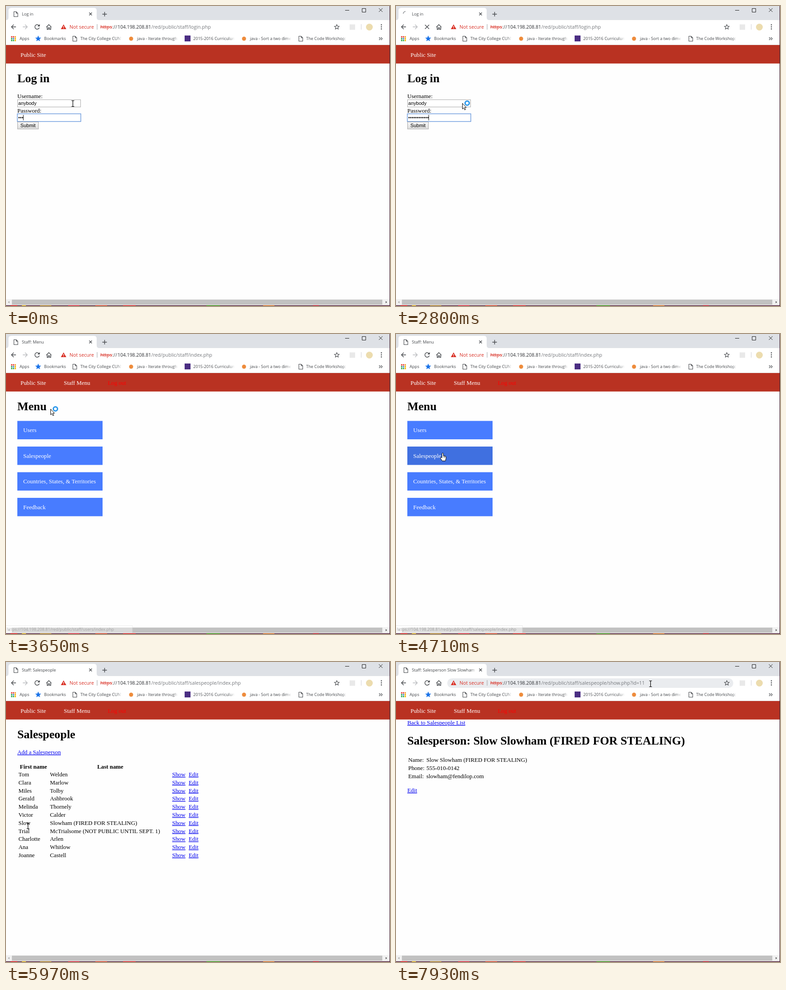
An HTML page for the animation above (8 s loop, 847 by 661 pixels).

```html
<!DOCTYPE html>
<html lang="en">
<head>
<meta charset="utf-8">
<title>Staff site walkthrough</title>
<style>
html, body { margin: 0; width: 100%; height: 100%; overflow: hidden; background: #fefefe; }
svg { display: block; }
text { white-space: pre; }
.page { font: 12.9px "Liberation Serif", serif; }
.head { font: bold 25.85px "Liberation Serif", serif; }
.bold { font-weight: bold; }
.mid { text-anchor: middle; }
.link { fill: #0000ee; text-decoration: underline; }
.form { font: 10.7px "Liberation Sans", sans-serif; }
.ui { font: 9.1px "Open Sans", sans-serif; fill: #45484c; }
.url { font: 10.7px "Open Sans", sans-serif; }
.host { font-size: 10.45px; }
.line { fill: none; stroke: #45484c; stroke-width: 1.4; }
.thin { fill: none; stroke: #222; stroke-width: 1; }
</style>
</head>
<body>
<svg id="stage" width="847" height="661" viewBox="0 0 847 661"></svg>
<script>
const LOOP = 8000;
const stage = document.getElementById('stage');

// Moments at which the screen is refreshed
const STEPS = [0, 280, 560, 1110, 1550, 1700, 2130,
  2410, 2530, 2680, 2800, 2950, 3080, 3210, 3340,
  3490, 3650, 3800, 3930, 4060, 4190, 4330, 4460,
  4580, 4710, 4860, 5000, 5140, 5280, 5420, 5560,
  5700, 5840, 5970, 6120, 6260, 6390, 6530, 6660,
  6780, 6920, 7060, 7210, 7330, 7480, 7630, 7780, 7930];
const KEYSTROKES = [280, 560, 1550, 1700, 2130, 2410, 2530, 2530, 2680];

// Pointer path: time, x, y
const PATH = [[0, 147.5, 215], [2680, 147.5, 215], [2800, 146, 214], [3340, 146, 214],
  [3490, 115, 178], [3650, 98, 165], [3800, 98, 153], [4060, 100, 200],
  [4330, 103, 256], [4580, 103, 262], [5280, 103, 263], [5560, 58, 330],
  [5840, 49, 355], [5970, 48.5, 361], [6120, 100, 371], [6390, 330, 363],
  [6660, 379, 354], [6780, 380, 352], [7210, 380, 352], [7330, 385, 335],
  [7630, 505, 110], [7780, 543, 39], [7930, 561.5, 48]];

// Status bubble: from, to, folder and file, opacity
const HINTS = [[3210, 3490, 'users/index.php', 1], [3490, 3800, 'users/index.php', .4],
  [4060, 4330, 'users/index.php', .5], [4460, 4860, 'salespeople/index.php', .5],
  [4860, 5280, 'salespeople/index.php', 1], [5280, 5420, 'salespeople/index.php', .4],
  [6780, 6920, 'salespeople/show.php...', .5], [6920, 7330, 'salespeople/show.php...', 1],
  [7330, 7480, 'salespeople/show.php...', .4]];

const LOADING = [[2800, 3080], [4860, 5280], [6920, 7060]];
const BUSY = [[2800, 4060], [4860, 5420], [6920, 7630]];

const PEOPLE = ['Tom Welden', 'Clara Marlow', 'Miles Tolby', 'Gerald Ashbrook',
  'Melinda Thornely', 'Victor Calder', 'Slow Slowham (FIRED FOR STEALING)',
  'Trial McTrialsome (NOT PUBLIC UNTIL SEPT. 1)', 'Charlotte Arlen', 'Ana Whitlow', 'Joanne Castell'];
const MENU = ['Users', 'Salespeople', 'Countries, States, &amp; Territories', 'Feedback'];

const within = (t, ranges) => ranges.some(([a, b]) => t >= a && t < b);
const text = (x, y, s, cls = 'page', fill) =>
  `<text x="${x}" y="${y}" class="${cls}"${fill ? ` style="fill:${fill}"` : ''}>${s}</text>`;
const rect = (x, y, w, h, fill, extra = '') =>
  `<rect x="${x}" y="${y}" width="${w}" height="${h}" fill="${fill}" ${extra}/>`;
const dot = (x, y, r, fill) => `<circle cx="${x}" cy="${y}" r="${r}" fill="${fill}"/>`;
const path = (d, cls = 'line', extra = '') => `<path d="${d}" class="${cls}" ${extra}/>`;
const shape = (d, fill, extra = '') => `<path d="${d}" fill="${fill}" ${extra}/>`;
const cross = (x, y, r, cls) => path(`M${x - r} ${y - r}l${2 * r} ${2 * r}m0 ${-2 * r}l${-2 * r} ${2 * r}`, cls);
const star = (x, y, r, fill, stroke) => {
  const points = Array.from({ length: 10 }, (_, i) => {
    const a = i * Math.PI / 5, d = i % 2 ? r * .45 : r;
    return `${x + d * Math.sin(a)},${y - d * Math.cos(a)}`;
  });
  return `<polygon points="${points.join(' ')}" fill="${fill}" stroke="${stroke}" stroke-width="1.1"/>`;
};
const doc = (x, y) => path(`M${x} ${y}h5l3.5 3.5v7.5h-8.5zM${x + 5} ${y}v3.5h3.5`, 'line', 'style="stroke-width:1.1"');
// Fades a label to white over the last 12 px and hides the rest
const fadeOut = (end, y, hidden) => rect(end - 12, y, 12.2, 14, 'url(#fade)') + rect(end, y, hidden, 14, '#fff');

const DEFS = `<defs>
  <linearGradient id="fade"><stop stop-color="#fff" stop-opacity="0"/><stop offset="1" stop-color="#fff"/></linearGradient>
  <linearGradient id="button" x2="0" y2="1"><stop stop-color="#f8f8f8"/><stop offset="1" stop-color="#dcdcdc"/></linearGradient>
</defs>`;

function pointerAt(t) {
  const i = PATH.findLastIndex(p => p[0] <= t), a = PATH[i], b = PATH[i + 1] || a;
  const k = b === a ? 0 : (t - a[0]) / (b[0] - a[0]);
  return [a[1] + (b[1] - a[1]) * k, a[2] + (b[2] - a[2]) * k];
}

function tabStrip(title, loading, t) {
  const icon = loading
    ? path('M16 17a5 5 0 0 1 5-5', 'line', `style="stroke:#8a8d91" transform="rotate(${(t - 2800) * .7} 21 17)"`)
    : doc(17.5, 12.5);
  return rect(0, 0, 847, 31, '#dee1e6')
    + shape('M0 31Q5.5 31 5.5 25V10Q5.5 4 12 4H194Q200 4 200 10V25Q200 31 206 31Z', '#fff')
    + icon + text(35, 21, title, 'ui') + fadeOut(177, 10, 20)
    + cross(186.5, 17.5, 3, 'line') + path('M212.5 18h10m-5-5v10')
    + path('M748 9.5h9M785.5 5.5h8v8h-8z', 'thin') + cross(826.5, 9, 4, 'thin');
}

function toolbar(file, loading, t) {
  let s = rect(0, 31, 847, 55, '#fff');
  if (t >= 7780) s += rect(113, 36, 631, 21, '#eaecef', 'rx="10.5"');
  else if (t >= 7060) s += shape('M551 36H123.5a10.5 10.5 0 0 0 0 21H551z', '#f1f3f4');
  s += path('M22 46H12m5-5l-5 5l5 5')
    + path('M37 46h10m-5-5l5 5l-5 5', 'line', 'style="stroke:#b9bbbe"')
    + (loading ? cross(68.5, 46, 4.5, 'line')
      : path('M73 43.5a5 5 0 1 0 .5 4') + shape('M74.5 40v5h-5z', '#45484c'))
    + path('M89 46.5l5.5-5.5l5.5 5.5M90.8 45.5v6h2.7v-3.5h2.5v3.5h2.7v-6')
    + shape('M127 40.5l6 10.5h-12z', '#d93025') + rect(126.4, 44, 1.3, 3.5, '#fff') + rect(126.4, 48.5, 1.3, 1.3, '#fff')
    + text(140, 50, 'Not secure', 'url', '#d93025') + rect(200.5, 40, 1, 12, '#9da0a4')
    + text(208, 50, 'https', 'url', '#d93025') + rect(208, 46, 26, 1, '#d93025')
    + text(234.5, 50, '://', 'url', '#45484c') + text(246, 50, '104.198.208.81', 'url host', '#303236')
    + text(320.5, 50, '/red/public/staff/' + file, 'url', '#75787c')
    + star(729.7, 46.5, 5.5, 'none', '#45484c')
    + rect(758, 40.5, 12, 12, '#e9e9e9') + rect(783, 40, 1, 12, '#d0d2d5') + dot(801.5, 46.5, 7.5, '#ecdcae');
  for (const y of [41.5, 46, 50.5]) s += dot(828, y, 1.3, '#45484c');
  return s;
}

function bookmarks() {
  const colors = ['#e8453c', '#e8453c', '#f4a22c', '#35a853', '#4285f4', '#f4b400', '#35a853', '#35a853', '#f4b400'];
  const orange = x => dot(x, 72, 4.5, '#ee8c3c');
  let s = colors.map((c, i) => rect(11 + i % 3 * 4, 66.5 + Math.floor(i / 3) * 4, 3, 3, c)).join('');
  s += text(30, 75, 'Apps', 'ui') + star(71, 72, 5.5, '#1a73e8', '#1a73e8') + text(84, 75, 'Bookmarks', 'ui');
  const items = [[164, 'The City College CUNY', doc(147.5, 66.5)], [289, 'java - Iterate through', orange(276)],
    [413, '2015-2016 Curriculum', rect(394, 65, 13, 13, '#4b2e83')],
    [538, 'java - Sort a two dime', orange(525)], [662, 'The Code Workshop: P', doc(646, 66.5)]];
  for (const [x, label, icon] of items) s += icon + text(x, 75, label, 'ui') + fadeOut(x + 91, 65, 30);
  return s + path('M823 69l3 3l-3 3m4-6l3 3l-3 3', 'line', 'style="stroke-width:1.1"') + rect(0, 85, 847, 1, '#e3e3e3');
}

function loginPage(t) {
  const count = 3 + KEYSTROKES.filter(k => k <= t).length;
  let s = text(25, 167.5, 'Log in', 'head') + text(25, 203, 'Username:') + text(25, 234.5, 'Password:')
    + rect(25.5, 206.5, 139, 16, '#fff', 'stroke="#a9a9a9"') + text(27, 218, 'anybody', 'form')
    + rect(25, 237.5, 140, 17, '#fff', 'stroke="#6797dc" stroke-width="1.4"')
    + rect(25.5, 255.5, 46, 15.5, 'url(#button)', 'stroke="#a8a8a8"') + text(48.5, 267, 'Submit', 'form mid');
  for (let i = 0; i < count; i++) s += dot(28.8 + i * 3.77, 246, 1.45, '#111');
  if (t < 1110 || t >= 1550) s += rect(26.4 + count * 3.77, 240, 1, 12, '#000');
  return s;
}

function menuPage([px, py]) {
  return text(25, 167.5, 'Menu', 'head') + MENU.map((label, i) => {
    const y = 191.5 + i * 56.5;
    const hover = px > 25 && px < 213 && py > y && py < y + 40.5;
    return rect(25, y, 188, 40.5, hover ? '#4070e0' : '#487cff') + text(38, y + 24.5, label, 'page', '#fff');
  }).join('');
}

function listPage() {
  return text(25, 167.5, 'Salespeople', 'head') + text(25, 203, 'Add a Salesperson', 'page link')
    + text(60.5, 234.5, 'First name', 'page bold mid') + text(230, 234.5, 'Last name', 'page bold mid')
    + PEOPLE.map((name, i) => {
      const y = 252 + i * 17.8, gap = name.indexOf(' ');
      return text(27.5, y, name.slice(0, gap)) + text(97, y, name.slice(gap + 1))
        + text(366.5, y, 'Show', 'page link') + text(403, y, 'Edit', 'page link');
    }).join('');
}

function personPage() {
  const name = PEOPLE[6];
  const rows = [['Name:', name], ['Phone:', '555-010-0142'], ['Email:', 'slowham@fendilop.com']];
  return text(25, 138, 'Back to Salespeople List', 'page link') + text(25, 182, 'Salesperson: ' + name, 'head')
    + rows.map(([label, value], i) => text(27, 219.7 + i * 18, label) + text(67, 219.7 + i * 18, value)).join('')
    + text(25, 287, 'Edit', 'page link');
}

function windowEdge(t) {
  const hint = HINTS.find(([a, b]) => t >= a && t < b);
  let s = rect(0, 646, 846, 13, '#f1f1f1') + rect(13, 647, 817, 11, '#c1c1c1')
    + shape('M4.5 652.5l3-2.5v5z', '#a3a3a3') + shape('M840.5 652.5l-3-2.5v5z', '#505050');
  if (hint) s += `<g opacity="${hint[3]}">` + rect(-1, 642.5, 280, 18, '#fff', 'stroke="#d4d4d4"')
    + text(2, 654, 'https://104.198.208.81/red/public/staff/' + hint[2], 'ui', '#737373') + '</g>';
  s += rect(846, 0, 1, 661, '#3d1a2c') + rect(0, 659.5, 847, 1.5, '#4a1834');
  const glints = [[10, 15, '#e02020'], [35, 9, '#e8c020'], [75, 25, '#b89030'], [137, 25, '#e03040'],
    [197, 26, '#e05030'], [258, 28, '#e03030'], [442, 30, '#40a020'], [567, 25, '#e08030'], [677, 13, '#c02030']];
  return s + glints.map(([x, w, c]) => rect(x, 659.5, w, 1.5, c)).join('');
}

function pointer([x, y], t) {
  const outline = 'stroke="#000" stroke-width="1" stroke-linejoin="round"';
  let s;
  if (within(t, BUSY) || (t >= 7630 && t < 7930)) {
    s = shape('M.5 .5V13L3.3 10.3L5.5 15L7.5 14L5.4 9.5H9Z', '#fff', outline);
    if (t < 7630) s += '<circle cx="11" cy="0" r="4.6" fill="#fff" stroke="#2d98ea" stroke-width="3"/>';
  } else if ((t >= 4060 && t < 5420) || (t >= 6530 && t < 7000)) {
    s = shape('M-1.5 1Q0-1 1.5 1V6L6 7Q8.2 7.5 7.5 11L6 17.5H-1L-5 11.5Q-5 8-1.5 10.5Z', '#fff', outline)
      + path('M2.5 7v3m2.5-2.5v3', 'thin');
  } else {
    s = path('M-3-6.5h2.3l.7 .7l.7-.7h2.3M0-6v12M-3 6.5h2.3l.7-.7l.7 .7h2.3', 'thin', 'style="stroke:#000;stroke-width:1.2"');
  }
  return `<g transform="translate(${x} ${y})">${s}</g>`;
}

function render(t) {
  const at = pointerAt(t), loading = within(t, LOADING);
  const [title, file, body] =
    t < 3080 ? ['Log in', 'login.php', loginPage(t)] :
    t < 5280 ? ['Staff: Menu', 'index.php', menuPage(at)] :
    t < 7060 ? ['Staff: Salespeople', 'salespeople/index.php', listPage()] :
    ['Staff: Salesperson Slow Slowham (F', 'salespeople/show.php?id=11', personPage()];
  const nav = text(32, 111.5, 'Public Site', 'page', '#fff')
    + (t < 3080 ? '' : text(127.5, 111.5, 'Staff Menu', 'page', '#fff') + text(224.5, 111.5, 'Log out', 'page', '#f00'));
  stage.innerHTML = DEFS + rect(0, 0, 847, 661, '#fefefe') + tabStrip(title, loading, t)
    + toolbar(file, loading, t) + bookmarks() + rect(0, 86, 847, 40.7, '#b93222') + nav
    + body + windowEdge(t) + pointer(at, t);
}

let shown = -1;
function tick() {
  const now = performance.now() % LOOP;
  const step = STEPS.findLast(s => s <= now);
  if (step !== shown) render(shown = step);
  requestAnimationFrame(tick);
}
tick();
</script>
</body>
</html>
```
